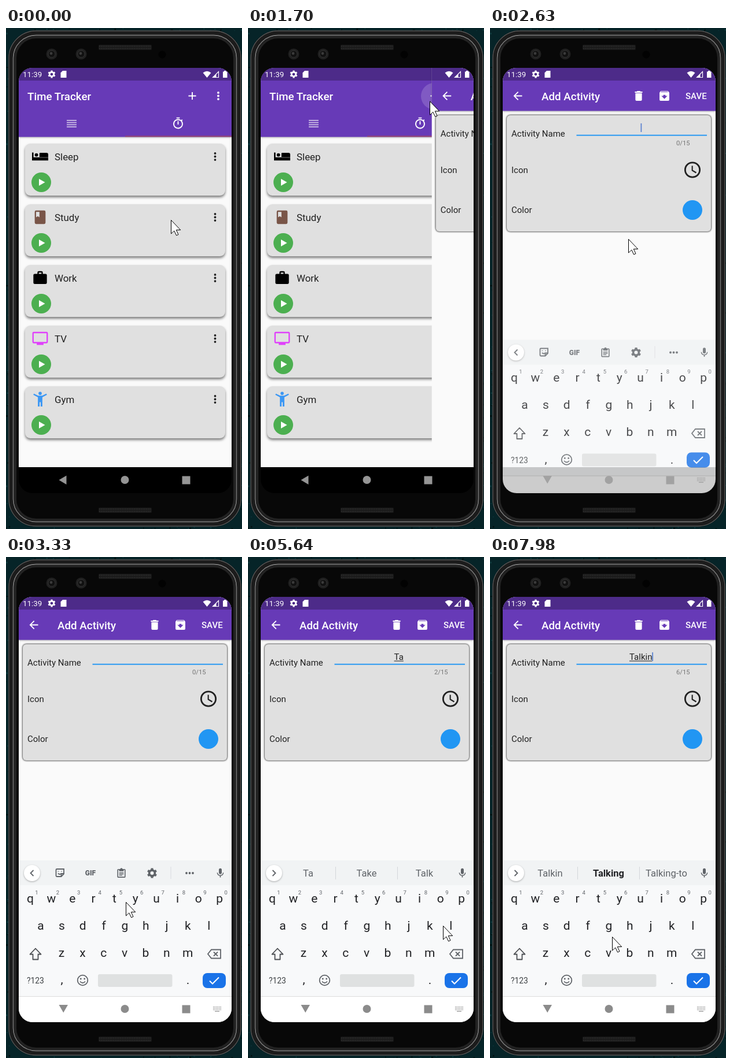
Animation of 408x867 px, one loop 8000 ms. Source, as an HTML page:

```html
<!DOCTYPE html>
<html lang="en">
<head>
<meta charset="utf-8">
<title>Time Tracker</title>
<style>
html, body { margin: 0; width: 100%; height: 100%; overflow: hidden; background: #06191c; }
svg { display: block; width: 100vw; height: 100vh; font-family: Roboto, sans-serif; }
text { white-space: pre; }
.mid { text-anchor: middle; }
.card { fill: #e0e0e0; filter: drop-shadow(0 3px 2.2px rgba(0,0,0,.5)); }
.form { fill: #e0e0e0; filter: drop-shadow(0 0 1.5px rgba(0,0,0,.9)) drop-shadow(0 0 .8px rgba(0,0,0,.35)); }
.title { font-size: 18.75px; font-weight: 500; fill: #fff; }
.label { font-size: 15px; fill: #212121; }
.key { font-size: 21px; fill: #202124; text-anchor: middle; }
.digit { font-size: 9.5px; fill: #5f6368; text-anchor: middle; }
.word { font-size: 16.5px; fill: #5f6368; text-anchor: middle; }
.word.strong { font-weight: 700; fill: #202124; }
.line { fill: none; stroke: #5f6368; stroke-width: 1.8; }
.lift { filter: drop-shadow(0 1px 1.5px rgba(0,0,0,.3)); }
</style>
</head>
<body>
<svg id="stage" viewBox="0 0 408 867" preserveAspectRatio="none"></svg>
<script>
const LOOP = 8000, WIDTH = 368, PITCH = 36.35;

const glyph = {
  book: 'M18 2H6a2 2 0 0 0-2 2v16a2 2 0 0 0 2 2h12a2 2 0 0 0 2-2V4a2 2 0 0 0-2-2zM6 4h5v8l-2.5-1.5L6 12z',
  work: 'M20 6h-4V4a2 2 0 0 0-2-2h-4a2 2 0 0 0-2 2v2H4a2 2 0 0 0-2 2v11a2 2 0 0 0 2 2h16a2 2 0 0 0 2-2V8a2 2 0 0 0-2-2zm-6 0h-4V4h4z',
  tv: 'M21.500 2H2.500a2 2 0 0 0-2 2v13a2 2 0 0 0 2 2H7v2.500h10V19h4.500a2 2 0 0 0 2-2V4a2 2 0 0 0-2-2zm0 15h-19V4h19z',
  bed: 'M0 6h2.200v7H24v4.700H0zM12 6.500h9.500A2.500 2.500 0 0 1 24 9v4.500H11V7.500a1 1 0 0 1 1-1zM6.500 7a2.500 2.500 0 1 1 0 5 2.500 2.500 0 0 1 0-5z',
  gym: 'M12 .8a2.400 2.400 0 1 1 0 4.800 2.400 2.400 0 0 1 0-4.800zM2.800 3.600L9 6.600h6l6.200-3 .9 1.700L15.300 9v13.700h-2.500v-6.400h-1.600v6.400H8.700V9L1.900 5.300z',
  add: 'M19 13h-6v6h-2v-6H5v-2h6V5h2v6h6z',
  list: 'M3 15h18v-2H3zm0 4h18v-2H3zm0-8h18V9H3zm0-6v2h18V5z',
  timer: 'M15 1H9v2h6zm-4 13h2V8h-2zm8-6.600l1.400-1.400-1.400-1.400-1.400 1.400A9 9 0 1 0 19 7.400zM12 20a7 7 0 1 1 0-14 7 7 0 0 1 0 14z',
  clock: 'M12 2a10 10 0 1 0 0 20 10 10 0 0 0 0-20zm0 18a8 8 0 1 1 0-16 8 8 0 0 1 0 16zM12.500 7H11v6l5.200 3.200.8-1.300-4.500-2.700z',
  back: 'M20 11H7.800l5.600-5.600L12 4l-8 8 8 8 1.400-1.400L7.800 13H20z',
  bin: 'M6 19a2 2 0 0 0 2 2h8a2 2 0 0 0 2-2V7H6zM19 4h-3.500l-1-1h-5l-1 1H5v2h14z',
  archive: 'M20.500 5.200l-1.400-1.700A1.500 1.500 0 0 0 18 3H6a1.500 1.500 0 0 0-1.200.5L3.500 5.200A2 2 0 0 0 3 6.500V19a2 2 0 0 0 2 2h14a2 2 0 0 0 2-2V6.500a2 2 0 0 0-.5-1.300zM12 17.500L6.500 12H10v-2h4v2h3.500zM5.100 5l.8-1h12l.9 1z',
  mic: 'M12 14a3 3 0 0 0 3-3V5a3 3 0 0 0-6 0v6a3 3 0 0 0 3 3zm5.300-3a5.300 5.300 0 0 1-10.600 0H5a7 7 0 0 0 6 6.700V21h2v-3.300A7 7 0 0 0 19 11z',
  clip: 'M19 3h-4.200a3 3 0 0 0-5.600 0H5a2 2 0 0 0-2 2v15a2 2 0 0 0 2 2h14a2 2 0 0 0 2-2V5a2 2 0 0 0-2-2zm0 17H5V5h2v3h10V5h2zM7 10h10v1.700H7zm0 3h10v1.700H7zm0 3h7v1.700H7z'
};
const icon = (name, x, y, fill = '#fff', size = 22.5) =>
  `<path d="${glyph[name]}" fill="${fill}" fill-rule="evenodd" transform="translate(${x - size / 2} ${y - size / 2}) scale(${size / 24})"/>`;
const rect = (x, y, w, h, fill, more = '') => `<rect x="${x}" y="${y}" width="${w}" height="${h}" fill="${fill}" ${more}/>`;
const disc = (x, y, r, fill, more = '') => `<circle cx="${x}" cy="${y}" r="${r}" fill="${fill}" ${more}/>`;
const shape = (d, fill, more = '') => `<path d="${d}" fill="${fill}" ${more}/>`;
const text = (x, y, s, cls, more = '') => `<text x="${x}" y="${y}" class="${cls}" ${more}>${s}</text>`;
const dots = (x, y, fill) => [-5.6, 0, 5.6].map(d => disc(x, y + d, 1.9, fill)).join('');
const range = n => [...Array(n).keys()];
const gear = (x, y, r, fill) => `<g transform="translate(${x} ${y})">` +
  disc(0, 0, r * .57, 'none', `stroke="${fill}" stroke-width="${r * .42}"`) +
  range(6).map(i => rect(-r * .24, -r, r * .48, r * .35, fill, `transform="rotate(${i * 60})"`)).join('') + '</g>';

function specks() {
  let seed = 7;
  const rnd = () => (seed = seed * 16807 % 2147483647) / 2147483647;
  return range(110).map(i => {
    const side = i % 3;
    const x = side ? (side > 1 ? 404 + rnd() * 4 : rnd() * 5) : rnd() * 408;
    const y = side ? rnd() * 867 : (rnd() < .5 ? rnd() * 4 : 863 + rnd() * 4);
    return rect(x, y, 1 + rnd() * 2, 1 + rnd() * 2, rnd() < .5 ? '#0f3c40' : '#03100f');
  }).join('');
}

function phone() {
  const ring = (inset, color, w) => rect(4 + inset, 4 + inset, 403 - inset * 2, 859 - inset * 2, 'none', `rx="${48 - inset}" stroke="${color}" stroke-width="${w}"`);
  const grille = y => rect(160, y, 92, 9, '#191919', 'rx="2"') +
    [2.5, 6.5].map(d => `<path d="M161 ${y + d}H251" stroke="#2b2b2b" stroke-width="2" stroke-dasharray="2 1"/>`).join('');
  return rect(0, 0, 408, 867, '#062428') + specks() +
    rect(4, 4, 403, 859, '#080808', 'rx="48"') +
    ring(1, '#5a5a5a', 1.4) + ring(4.5, '#1c1c1c', 5) + ring(8.5, '#747474', 1.8) + ring(12, '#222', 4) +
    grille(29) + grille(830) +
    [79, 130].map(x => disc(x, 45, 9.5, '#202020') + disc(x, 45, 6, '#111', 'stroke="#343434"') + disc(x - 1, 44, 2.4, '#3a3a3a')).join('') +
    disc(270, 46, 6.5, '#020202');
}

function activityCard([name, art, color], i) {
  const y = 200 + i * 105;
  return rect(33, y, 346, 90, '#e0e0e0', 'rx="9" class="card"') +
    icon(art, 59, y + 22.5, color, 28) +
    text(84, y + 28.5, name, '', 'font-size="16.9" fill="#212121"') + dots(361.5, y + 22.5, '#212121') +
    disc(61, y + 67, 17, '#4caf50') + shape(`M57 ${y + 61}v12l10.500-6z`, '#fff');
}

function listPage() {
  return rect(22, 69, WIDTH, 700, '#fafafa') +
    rect(22, 69, WIDTH, 119.5, '#673ab7', 'class="lift"') + rect(22, 69, WIDTH, 22, '#4d2b89') +
    text(37, 124.5, 'Time Tracker', 'title') + icon('add', 322, 117.5) + dots(367, 117.5, '#fff') +
    icon('list', 113.5, 165.5, '#cdbfe6') + icon('timer', 297.5, 165) +
    rect(206, 186.5, 184, 1.8, '#99456b') +
    [['Sleep', 'bed', '#000'], ['Study', 'book', '#795548'], ['Work', 'work', '#000'],
     ['TV', 'tv', '#e040fb'], ['Gym', 'gym', '#3b97f4']].map(activityCard).join('') +
    '<circle id="ripple" cx="322" cy="118" fill="#fff"/>';
}

function formPage() {
  return rect(22, 69, WIDTH, 700, '#fafafa') +
    rect(22, 69, WIDTH, 74.5, '#673ab7', 'class="lift"') + rect(22, 69, WIDTH, 22, '#4d2b89') +
    icon('back', 48, 117.5) + text(89, 124.5, 'Add Activity', 'title') +
    icon('bin', 257, 117.5) + icon('archive', 301.5, 117.5) +
    text(338, 122.8, 'SAVE', '', 'font-size="15" font-weight="500" fill="#fff"') +
    rect(29, 151, 353, 201, '#e0e0e0', 'rx="6" class="form"') +
    text(37, 188, 'Activity Name', 'label') + text(37, 251, 'Icon', 'label') + text(37, 320, 'Color', 'label') +
    '<rect id="rule" x="149.500" width="225.500"/>' +
    '<text id="entry" x="260.700" y="178" class="label mid"></text><rect id="under" y="179.500" height="1" fill="#212121"/>' +
    '<rect id="caret" y="165" width="1.800" height="15" fill="#5c83cf"/>' +
    '<text id="count" x="322" y="203" font-size="11.250" fill="#757575"></text>' +
    icon('clock', 350, 245.5, '#212121', 33.75) + disc(350, 315, 17, '#2196f3');
}

function statusIcons() {
  return text(29, 85, '11:39', '', 'font-size="13.300" fill="#fff"') + gear(79, 80, 6.5, '#fff') +
    shape('M98 74h6.500v12h-10V77.500z', '#fff') +
    shape('M340.500 77.500q7-5.500 14 0l-7 8.500z', '#fff') +
    shape('M357.500 85.500h10v-10z', 'none', 'stroke="#fff" stroke-width="1.200"') + shape('M357.500 85.500h6v-6z', '#fff') +
    shape('M377 74h3.500v1.500h2v10.500h-7.500V75.500h2z', '#fff');
}

const rows = [['qwertyuiop', 42, 597.5], ['asdfghjkl', 60, 644.5], ['zxcvbnm', 96, 691.5]];
const keySpot = ch => {
  const r = rows.findIndex(([letters]) => letters.includes(ch.toLowerCase()));
  return { x: rows[r][1] + rows[r][0].indexOf(ch.toLowerCase()) * PITCH, y: 559 + r * 47 };
};

function keyboard() {
  const letters = rows.map(([keys, x, y]) => [...keys].map((k, i) =>
    text(x + i * PITCH, y, k, 'key', `data-k="${k}" data-y="${y}"`)).join('')).join('');
  const digits = [...'1234567890'].map((d, i) => text(53 + i * PITCH, 583.5, d, 'digit')).join('');
  return rect(22, 525, WIDTH, 300, '#f8f9fa') + rect(22, 525, WIDTH, 43, '#f1f3f4') +
    rect(22, 760, WIDTH, 110, '#fff') + rect(22, 760, WIDTH, 1, '#dcdcdc') +
    disc(45, 547, 14, '#fff', 'class="lift"') +
    '<path id="chevron" class="line"/>' + icon('mic', 370.5, 547, '#5f6368', 20) +
    '<g id="tools">' +
    shape('M88 540h12v8.500l-4.500 4.500H88q-1.500 0-1.500-1.500v-10q0-1.500 1.500-1.500M100.500 548h-5v5M90 547.500q3 3 5.500 0M90.500 543.500v1M96 543.500v1', 'none', 'class="line"') +
    text(146, 551, 'GIF', 'mid', 'font-size="12" font-weight="900" fill="#5f6368"') +
    icon('clip', 199.5, 547, '#5f6368', 19) + gear(252.5, 547, 8.5, '#5f6368') + rect(284.5, 536, 1, 21, '#dadce0') +
    [312, 317.5, 323].map(x => disc(x, 547, 1.9, '#5f6368')).join('') + '</g>' +
    '<g id="words">' + rect(151, 536, 1, 22, '#d3d6da') + rect(258, 536, 1, 22, '#d3d6da') +
    [104, 205, 305].map(x => text(x, 553.3, '', 'word')).join('') + '</g>' +
    letters + digits +
    '<path id="shift" d="M51 677.500l-9.500 10h5V696.500h9V687.500h5z" stroke="#4a4d51" stroke-width="1.800" stroke-linejoin="round"/>' +
    shape('M355 679.500h16v15h-16l-6-7.500zM359 683.500l7 7M366 683.500l-7 7', 'none', 'class="line"') +
    text(51, 738, '?123', 'mid', 'font-size="13.800" fill="#3c4043"') +
    text(96.500, 738, ',', 'key') + text(314.500, 739, '.', 'key') +
    disc(132.5, 732.5, 8.8, 'none', 'class="line"') + disc(129.3, 730, 1.4, '#5f6368') + disc(135.7, 730, 1.4, '#5f6368') +
    shape('M128 734.500q4.500 5 9 0', 'none', 'class="line"') +
    rect(159, 722, 128.5, 22, '#dfe1e1', 'rx="3"') +
    rect(340, 720, 40, 26, '#1a73e8', 'rx="8"') +
    shape('M352 733.500l5 5 11-11', 'none', 'stroke="#fff" stroke-width="2"') +
    '<g id="popup">' + rect(-18, -52, 36, 104, '#f1f3f4', 'rx="3" class="lift"') +
    '<text id="popKey" class="key" y="-17" style="font-size:26px"></text>' + text(9, -5, '...', 'mid', 'font-size="13" fill="#202124"') + '</g>';
}

const stage = document.getElementById('stage');
stage.innerHTML = `<defs><clipPath id="screen"><rect x="22" y="69" width="368" height="736" rx="24"/></clipPath></defs>` +
  phone() + `<g clip-path="url(#screen)">${listPage()}<g id="form">${formPage()}</g>${statusIcons()}` +
  rect(22, 760, WIDTH, 45, '#000') + `<g id="board">${keyboard()}</g><g id="nav"><path id="navBack"/>` +
  disc(205.5, 782, 7, 'inherit') + `<path d="M304.500 775.500h14v14h-14z"/></g><g id="hide">` +
  shape('M358 778.500h14M358 781h14M358 783.500h14', 'none', 'stroke="#a4a4a4" stroke-width="1.500" stroke-dasharray="1.500 1"') +
  rect(361, 785.5, 8, 1.5, '#a4a4a4') + '</g></g>' +
  '<path id="mouse" d="M.5.5V24l5.300-5 3.800 8 3.400-1.500-3.700-8h7.400z" fill="#fff" stroke="#000" stroke-linejoin="round"/>';
const $ = id => document.getElementById(id);
const set = (el, attrs) => Object.entries(attrs).forEach(([k, v]) => el.setAttribute(k, v));
const show = (el, on) => { el.style.display = on ? '' : 'none'; };
const keyEls = [...document.querySelectorAll('[data-k]')];
const wordEls = [...document.querySelectorAll('.word')];

// Bursts of redraws: first time, last time, count.
const bursts = [[150, 940, 11], [1000, 1780, 11], [1860, 2630, 11], [2700, 3480, 11], [3560, 4020, 7], [4170, 4950, 11],
  [5030, 5810, 11], [5890, 6510, 9], [6660, 7430, 11], [7510, 7600, 2], [7750, 7980, 4]];
const ticks = bursts.flatMap(([a, b, n]) => range(n).map(i => Math.round(a + (b - a) * i / (n - 1))));
const snap = t => ticks.reduce((last, tick) => tick <= t ? tick : last, 0);

const mousePath = [[150, 285, 332], [500, 301, 272], [940, 322, 188], [1070, 340, 136], [1150, 342, 125], [1180, 342, 125],
  [1330, 316, 122], [1500, 314, 125], [1860, 314, 129], [2050, 306, 158], [2400, 258, 310], [2630, 239, 365], [2860, 232, 420],
  [3300, 208, 590], [3640, 194, 688], [3860, 186, 640], [4020, 184, 588], [4170, 184, 584], [4330, 184, 584], [4600, 130, 612],
  [4950, 57, 637], [5110, 57, 637], [5350, 190, 640], [5560, 337, 638], [5660, 337, 638], [5740, 345, 640], [5900, 345, 640],
  [6120, 312, 640], [6300, 312, 640], [6660, 312, 636], [6860, 292, 592], [7020, 292, 592], [7400, 272, 682], [7510, 272, 685],
  [7750, 272, 685], [7830, 262, 681], [7980, 211, 657]];
const slide = [[1420, 368], [1500, 358], [1570, 332], [1640, 285], [1710, 219], [1780, 151], [1860, 87], [1930, 44], [2010, 15], [2090, 0]];
const rise = [[2390, 110, 0], [2480, 75, .25], [2553, 38, .55], [2630, 14.5, .8], [2700, 4, .95], [2780, 0, 1]];
const at = (keys, t) => {
  if (t <= keys[0][0]) return keys[0].slice(1);
  const i = keys.findIndex(k => k[0] >= t);
  if (i < 0) return keys[keys.length - 1].slice(1);
  const [a, b] = [keys[i - 1], keys[i]], f = (t - a[0]) / (b[0] - a[0]);
  return a.slice(1).map((v, j) => v + (b[j + 1] - v) * f);
};

// Key down, key up, key, suggestions afterwards.
const typing = [
  [4170, 4320, 'T', ['T', 'The', 'Thanks']],
  [5000, 5060, 'a', ['Ta', 'Take', 'Talk']],
  [5720, 5890, 'l', ['Tal', 'Talk', 'Take']],
  [6190, 6280, 'k', ['Talk', 'Talking', 'Talked']],
  [6910, 7010, 'i', ['Talki', 'Talking', 'Talkie']],
  [7750, 7820, 'n', ['Talkin', 'Talking', 'Talking-to']]
];
const FOCUS = 2400, CAPS = 3620;

function draw(now) {
  const t = snap(now);
  const typed = typing.filter(k => k[1] <= t), entry = typed.map(k => k[2]).join('');
  const last = typed[typed.length - 1], focused = t >= FOCUS;

  const [x] = at(slide, t);
  show($('form'), x < WIDTH);
  set($('form'), { transform: `translate(${x} 0)` });
  const r = Math.min(1, Math.max(0, (t - 1300) / 250));
  set($('ripple'), { r: 8 + 15 * r, opacity: r > 0 && t < 1900 ? .16 : 0 });

  set($('rule'), focused ? { y: 184.700, height: 1.900, fill: '#2196f3' } : { y: 185, height: 1, fill: '#8c8c8c' });
  $('entry').textContent = entry;
  const w = entry ? $('entry').getComputedTextLength() : 0;
  set($('under'), { x: 260.700 - w / 2, width: w });
  set($('caret'), { x: 260.500 + w / 2 });
  show($('caret'), focused && (t - (last ? last[1] : 2500) + 1000) % 1000 < 500);
  $('count').textContent = focused ? entry.length + '/15' : '';

  const [dy, alpha] = at(rise, t), light = alpha > .4;
  set($('board'), { transform: `translate(0 ${dy})`, opacity: alpha });
  show($('board'), alpha > 0);
  const caps = t >= CAPS && !entry;
  keyEls.forEach(el => {
    el.textContent = caps ? el.dataset.k.toUpperCase() : el.dataset.k;
    set(el, { y: +el.dataset.y + (caps ? 3 : 0) });
  });
  set($('shift'), { fill: caps ? '#4a4d51' : 'none' });
  show($('tools'), !entry);
  show($('words'), entry);
  set($('chevron'), { d: entry ? 'M42.500 542l5 5-5 5' : 'M47.500 542l-5 5 5 5' });
  wordEls.forEach((el, i) => {
    el.textContent = last ? last[3][i] : '';
    el.classList.toggle('strong', i === 1 && entry.length > 4);
  });

  const down = typing.find(k => t >= k[0] && t < k[1]);
  show($('popup'), down);
  if (down) {
    const spot = keySpot(down[2]);
    set($('popup'), { transform: `translate(${spot.x} ${spot.y})` });
    $('popKey').textContent = down[2];
  }

  set($('nav'), { fill: alpha > 0 && alpha < 1 ? '#a2a2a2' : light ? '#8b8b8b' : '#959595' });
  set($('navBack'), { d: light ? 'M91.500 775h15.500l-7.750 13.500z' : 'M104.500 774.500v15.500l-13-7.750z' });
  show($('hide'), light);

  const [mx, my] = at(mousePath, t);
  set($('mouse'), { transform: `translate(${mx} ${my})` });
}

function frame() {
  draw(performance.now() % LOOP);
  requestAnimationFrame(frame);
}
frame();
</script>
</body>
</html>
```
